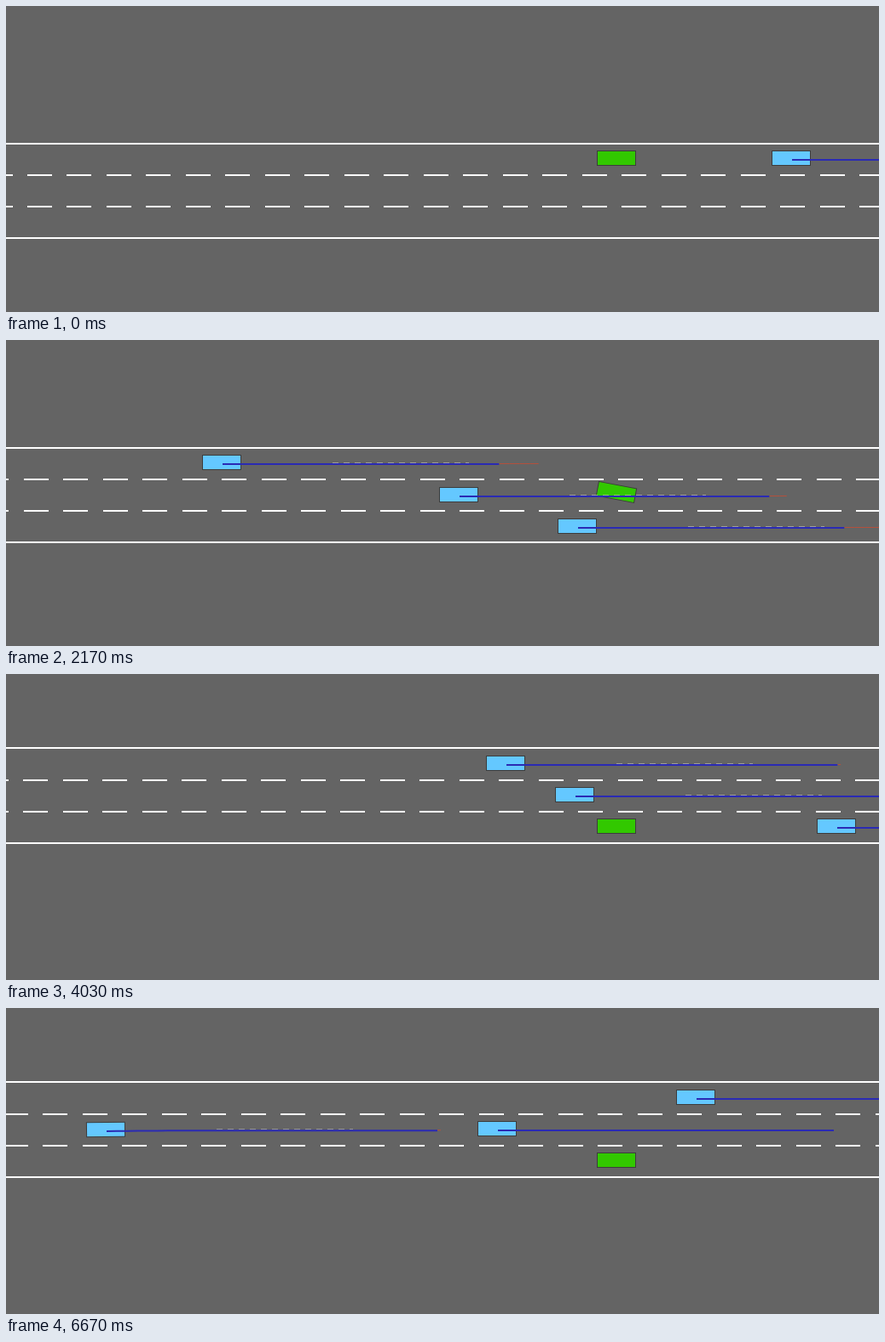
Recreate the animation shown at these times as an HTML page with a canvas. Size 1024 by 360 pixels, loop 6.71 s.

```html
<!DOCTYPE html>
<html>
<head>
<meta charset="utf-8">
<title>Highway</title>
<style>
html, body { margin: 0; width: 100%; height: 100%; overflow: hidden; background: #646464; }
canvas { display: block; }
</style>
</head>
<body>
<canvas id="stage" width="1024" height="360"></canvas>
<script>
const ctx = document.getElementById('stage').getContext('2d');
const LOOP = 6710, STEP = 100 / 3, LANE = 37.15, DASH = 46.48, PLAN = 395;
const EGO_X = 716, EGO_Y = 179, EGO_SPEED = 24;

// Lane changes of the green car
const egoTurns = [
  { at: 11.8, by: 2 }, { at: 35.7, by: -2 }, { at: 59.6, by: 2 },
  { at: 133.2, by: -1 }, { at: 158, by: 1 }
];

// Each car is at x in step k, falls back by v per step and brakes from step `from`
const traffic = [
  { lane: 0, k: 0, x: 921, v: 9.58, brake: { from: 49, by: 5.27 } },
  { lane: 1, k: 49, x: 737, v: 12.08, brake: { from: 49, by: 1.55 } },
  { lane: 2, k: 49, x: 801, v: 8.21, brake: { from: 67, by: 5.97 } },
  { lane: 0, k: 80, x: 958, v: 9.07, brake: { from: 121, by: 0.23 } },
  { lane: 1, k: 121, x: 667, v: 8.37, brake: { from: 133, by: 4.2 }, turn: { at: 141.5, by: 1 } },
  { lane: 2, k: 121, x: 974, v: 8, brake: { from: 158, by: 6.8 }, turn: { at: 180, by: -1 } },
  { lane: 1, k: 200, x: 576, v: 9.8 },
  { lane: 0, k: 200, x: 809, v: 9.2 }
];

// Share of a lane change completed n steps after it began
function settle(n) {
  if (n <= 0) return 0;
  return 1 - Math.exp(-0.24 * n) * (Math.cos(0.073 * n) + 2.667 * Math.sin(0.073 * n));
}

// Distance gained n steps after the speed began to ease up by one
const ramp = (n, tau) => n > 0 ? n - tau * (1 - Math.exp(-n / tau)) : 0;

const driven = k => 22.93 * k + 1.5 * ramp(k - 60, 18);
const egoLane = k => egoTurns.reduce((sum, { at, by }) => sum + by * settle(k - at), 0);
const carLane = ({ lane, turn }, k) => lane + (turn ? turn.by * settle(k - turn.at) : 0);

function carX({ k: k0, x, v, brake }, k) {
  return x - v * (k - k0) - (brake ? brake.by * ramp(k - brake.from, 9) : 0);
}

// The red tail of a plan swells while its car brakes
function tailLength({ brake }, k) {
  if (!brake) return 0;
  const n = k - brake.from;
  return Math.min(1, brake.by / 4) * 85 * Math.exp(-(((n - 6) / 12) ** 2)) + (n > 0 ? 4 : 0);
}

function box(x, y, angle, color) {
  ctx.save();
  ctx.translate(x, y);
  ctx.rotate(angle);
  ctx.fillStyle = color;
  ctx.strokeStyle = '#3c3c3c';
  ctx.lineWidth = 1;
  ctx.fillRect(-22.5, -8.5, 45, 17);
  ctx.strokeRect(-22.5, -8.5, 45, 17);
  ctx.restore();
}

function trace(from, to, pointAt, color, width, dash = []) {
  ctx.beginPath();
  for (let d = from; d < to; d += 12) ctx.lineTo(...pointAt(d));
  ctx.lineTo(...pointAt(to));
  ctx.strokeStyle = color;
  ctx.lineWidth = width;
  ctx.setLineDash(dash);
  ctx.stroke();
}

function drawRoad(k, top) {
  ctx.fillStyle = '#646464';
  ctx.fillRect(0, 0, 1024, 360);
  ctx.fillStyle = '#fff';
  const start = 25 - driven(k) % DASH - DASH;
  for (let i = 0; i < 4; i++) {
    const y = Math.floor(top + i * LANE) - 1;
    if (i % 3 === 0) ctx.fillRect(0, y, 1024, 2);
    else for (let x = start; x < 1024; x += DASH) ctx.fillRect(Math.round(x), y, 29, 2);
  }
}

function drawCar(car, k, top) {
  const x = Math.round(carX(car, k));
  if (x < -23 || x > 1047) return;
  const yOf = lane => Math.floor(top + 17.5 + lane * LANE);
  const angle = (carLane(car, k + 0.5) - carLane(car, k - 0.5)) * LANE / 15;
  box(x, yOf(carLane(car, k)), angle, '#64c8ff');

  const turning = car.turn && k > car.turn.at;
  const planLane = d => turning ? carLane(car, k + d / 15) : car.lane;
  const plan = dy => d => [x + d, (turning ? top + 17 + planLane(d) * LANE : yOf(car.lane)) + dy];
  const tail = tailLength(car, k), blue = PLAN - 1.5 * tail;
  if (car.brake) trace(130, Math.min(290, blue), plan(0.5), 'rgba(200,200,190,.6)', 1, [7, 6]);
  if (tail > 1) trace(blue, blue + tail, plan(1.5), '#b4503c', 1);
  trace(1, blue, plan(2), '#2a2ab4', 2);
}

function draw(k) {
  const top = 162.3 - egoLane(k) * LANE;
  drawRoad(k, top);
  const drift = (egoLane(k + 0.5) - egoLane(k - 0.5)) * LANE;
  box(EGO_X, EGO_Y, 0.7 * drift / EGO_SPEED, '#32c800');
  for (const car of traffic) drawCar(car, k, top);
}

function tick() {
  const t = Math.floor(performance.now() % LOOP / 10) * 10;
  draw(Math.min(200, Math.floor((t + 4) / STEP)));
  requestAnimationFrame(tick);
}
tick();
</script>
</body>
</html>
```
